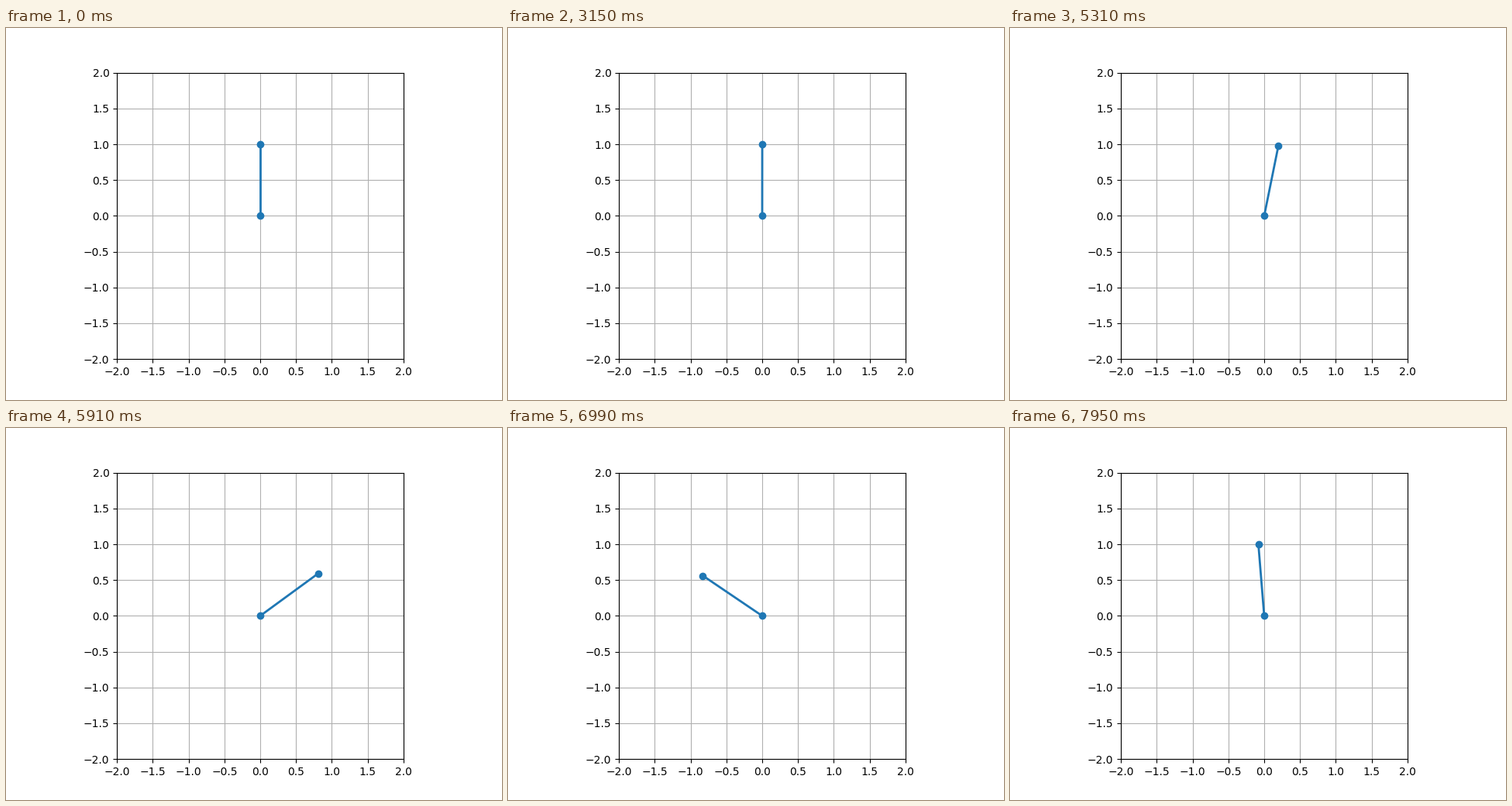
These frames come from a looping animation (640 px wide and 480 px high, 8000 ms). A matplotlib script:

```python
import math

import matplotlib.pyplot as plt
from matplotlib.animation import FuncAnimation

LOOP = 8000       # ms
TICK = 20         # ms per drawn frame
STEP = 60         # ms per simulation step
START = 3510      # a moment on the simulation grid
LOWEST = 6457.5   # time at which the rod hangs straight down
RATE = 0.1567     # sqrt(g / length) * dt, per simulation step
RELEASE = 500     # the rod stands perfectly still until here
MIN_ANGLE = 2e-6

fig = plt.figure(figsize=(6.4, 4.8), dpi=100)
ax = fig.add_subplot(autoscale_on=False, xlim=(-2, 2), ylim=(-2, 2))
ax.set_aspect("equal")
ax.set_xticks([i / 2 for i in range(-4, 5)])
ax.set_yticks([i / 2 for i in range(-4, 5)])
ax.grid()
rod, = ax.plot([0, 0], [0, 1], "o-", lw=2)


def angle(ms):
    """Clockwise angle from upright of a pendulum falling off its balance point."""
    if ms < RELEASE:
        return 0.0
    now = START + (ms - START) // STEP * STEP
    steps = (now - LOWEST) / STEP
    return max(MIN_ANGLE, 4 * math.atan(math.exp(RATE * steps)))


def update(i):
    a = angle(i * TICK + TICK // 2)
    rod.set_data([0, math.sin(a)], [0, math.cos(a)])
    return rod,


anim = FuncAnimation(fig, update, frames=LOOP // TICK, interval=TICK,
                     repeat=True, repeat_delay=0, cache_frame_data=False)
plt.show()
```
